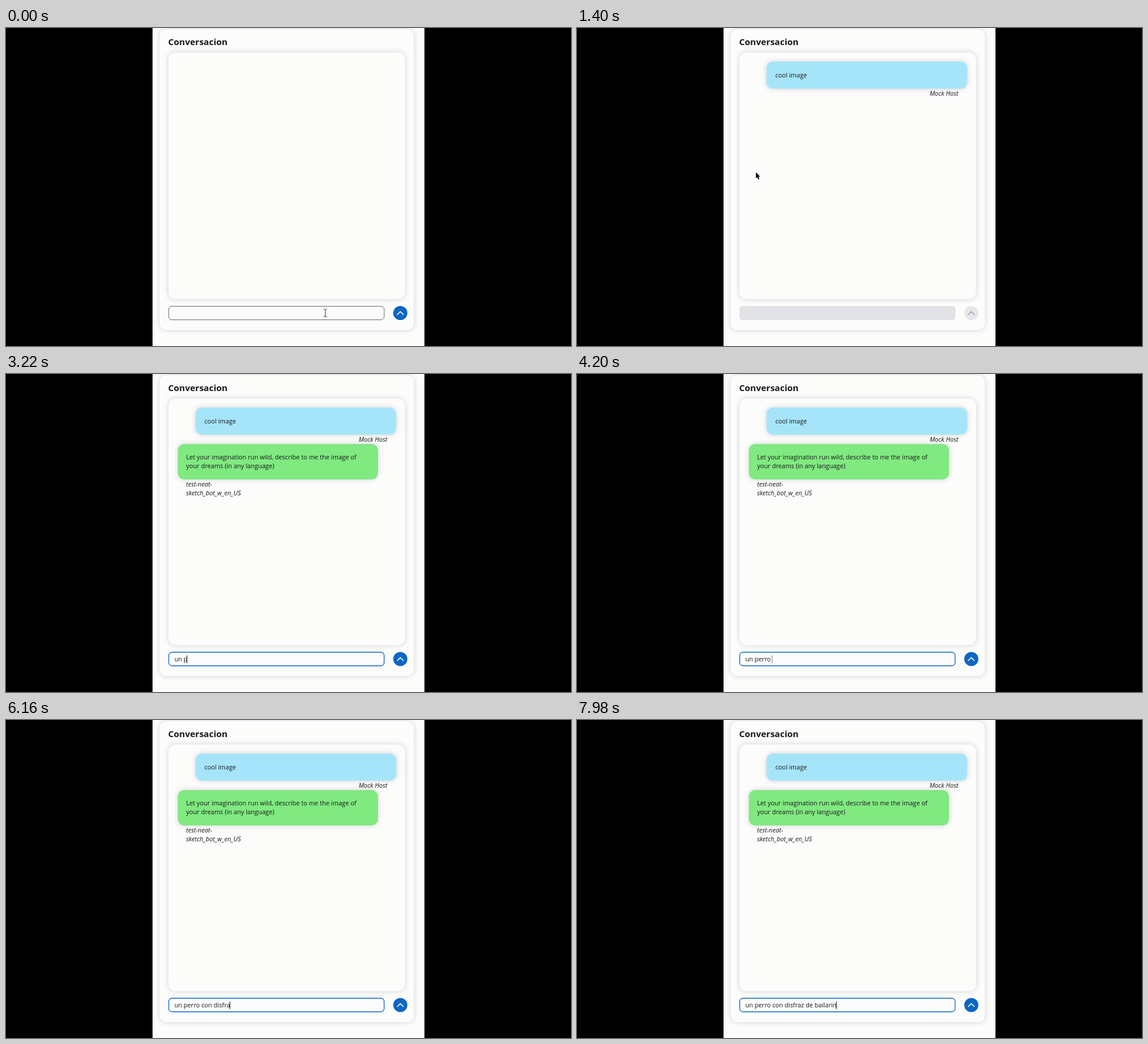
Recreate the animation shown at these times as an HTML page with a canvas. Size 960x540 px, loop 8 s.

```html
<!DOCTYPE html>
<html lang="es">
<head>
<meta charset="utf-8">
<title>Chat</title>
<style>
  html, body { margin: 0; width: 100%; height: 100%; overflow: hidden; background: #000; }
  canvas { display: block; width: 960px; height: 540px; }
</style>
</head>
<body>
<canvas id="stage" width="960" height="540"></canvas>
<script>
const ctx = document.getElementById('stage').getContext('2d');
const LOOP = 8000;
const SANS = '"Open Sans", "Noto Sans", sans-serif';
const BODY = `10.65px ${SANS}`;
const NAME = `italic ${BODY}`;
const PAPER = '#fcfcfb', INK = '#18181a', BLUE = '#0c66c4';

const SENT = 1000, REPLY = 1660, FOCUS = 2200, ERASE = 5340;

// Typing bursts: start, ms per key, keys
const FIRST = [[240, 70, 'cool image']];
const SECOND = [
  [2680, 130, 'un '], [3100, 135, 'perro '], [4620, 85, 'con '],
  [4980, 80, 'de'], [5600, 105, 'disfraz '], [6440, 100, 'de bai'],
  [7280, 35, 'larin']
];

// Mouse waypoints: time, x, y
const PATH = [[1000, 420, 484], [1380, 304, 245], [1700, 304, 245], [2160, 389, 484]];

function typed(bursts, t) {
  let text = '', last = -Infinity;
  for (const [start, step, keys] of bursts) {
    if (t < start) break;
    if (keys === 'de' && t >= ERASE) continue;
    const n = Math.min(keys.length, Math.floor((t - start) / step) + 1);
    text += keys.slice(0, n);
    last = start + (n - 1) * step;
  }
  return { text, last };
}

function along(path, t) {
  let i = 0;
  while (i < path.length - 2 && t >= path[i + 1][0]) i++;
  const [t0, x0, y0] = path[i], [t1, x1, y1] = path[i + 1];
  const p = Math.max(0, Math.min(1, (t - t0) / (t1 - t0)));
  const e = p * p * (3 - 2 * p);
  return [x0 + (x1 - x0) * e, y0 + (y1 - y0) * e];
}

function box(x, y, w, h, r) {
  ctx.beginPath();
  ctx.roundRect(x, y, w, h, r);
}

function glowBox(x, y, w, h, r, fill) {
  ctx.save();
  ctx.shadowColor = 'rgba(70, 70, 95, 0.24)';
  ctx.shadowBlur = 8;
  ctx.fillStyle = fill;
  box(x, y, w, h, r);
  ctx.fill();
  ctx.restore();
}

function label(text, x, y, font = BODY, align = 'left') {
  ctx.font = font;
  ctx.textAlign = align;
  ctx.fillStyle = INK;
  ctx.fillText(text, x, y);
}

function line(points, color, width) {
  ctx.strokeStyle = color;
  ctx.lineWidth = width;
  ctx.beginPath();
  points.forEach(([x, y]) => ctx.lineTo(x, y));
  ctx.stroke();
}

function drawPage() {
  ctx.fillStyle = '#000';
  ctx.fillRect(0, 0, 960, 540);
  ctx.fillStyle = PAPER;
  ctx.fillRect(249, 0, 462, 540);
  glowBox(261, 2, 432, 511, 12, PAPER);
  glowBox(276, 41.5, 402, 419, 12, PAPER);
  label('Conversacion', 275.5, 29, `bold 15px ${SANS}`);
}

function drawMessages(t) {
  if (t >= SENT) {
    glowBox(322, 57, 341, 46, 11, '#a6e5f9');
    label('cool image', 337, 84);
    label('Mock Host', 648, 115, NAME, 'right');
  }
  if (t >= REPLY) {
    glowBox(292, 119, 340, 60, 11, '#80e980');
    label('Let your imagination run wild, describe to me the image of', 306, 145);
    label('your dreams (in any language)', 306, 160);
    label('test-neat-', 306, 191, NAME);
    label('sketch_bot_w_en_US', 306, 206, NAME);
  }
}

function caretAlpha(t, last) {
  if (t < FOCUS) return t > 140 && t < SENT ? 1 : 0;
  if (last < 0) return t >= 2500 ? 1 : 0;
  if (t >= ERASE && t < 5600) return 0;
  if (t >= 4100 && t < 4360) return Math.max(0, 1 - (t - 4100) / 220);
  return t >= 4360 && t < 4620 ? 0 : 1;
}

function drawField(t) {
  const off = t >= SENT && t < REPLY;
  const focused = (t > 140 && t < SENT) || t >= FOCUS;
  if (off) {
    ctx.fillStyle = '#e2e3e6';
    box(276, 472, 367, 24, 5);
    ctx.fill();
  } else {
    ctx.strokeStyle = focused ? BLUE : '#6b6b70';
    ctx.lineWidth = focused ? 1.3 : 1;
    box(276.5, 472.5, 366, 23, 5.5);
    ctx.stroke();
    const { text, last } = typed(t < SENT ? FIRST : SECOND, t);
    label(text, 286, 488);
    const alpha = caretAlpha(t, last);
    if (alpha > 0) {
      const x = Math.round(286 + ctx.measureText(text).width) - 0.5;
      ctx.globalAlpha = alpha;
      line([[x, 478], [x, 491]], INK, 1);
      ctx.globalAlpha = 1;
    }
  }
  ctx.fillStyle = off ? '#e6e7ea' : BLUE;
  ctx.beginPath();
  ctx.arc(670, 484, 12, 0, Math.PI * 2);
  ctx.fill();
  line([[664.5, 487], [670, 481.7], [675.5, 487]], off ? '#a2a2a8' : '#fff', 1.6);
}

function drawBeam(x, y) {
  const color = '#3c3c40';
  line([[x, y - 6], [x, y + 6]], color, 1);
  for (const s of [-1, 1]) {
    line([[x - 3, y + 6.5 * s], [x, y + 5.5 * s], [x + 3, y + 6.5 * s]], color, 1);
  }
}

function drawArrow(x, y) {
  const shape = [[0, 0], [0, 10.5], [2.3, 8.3], [4, 12.2], [5.8, 11.4], [4.2, 7.6], [7.3, 7.6]];
  ctx.beginPath();
  shape.forEach(([dx, dy]) => ctx.lineTo(x + dx, y + dy));
  ctx.closePath();
  ctx.strokeStyle = '#fff';
  ctx.lineWidth = 1.5;
  ctx.stroke();
  ctx.fillStyle = '#000';
  ctx.fill();
}

function drawMouse(t) {
  if (t < 240) return drawBeam(542.5, 484);
  if (t < SENT || t >= 2680) return;
  const [x, y] = along(PATH, t);
  if (t >= REPLY && y > 472) drawBeam(Math.round(x) + 0.5, y - 1);
  else drawArrow(x, y);
}

let start;
function tick(now) {
  start ??= now;
  const t = (now - start) % LOOP;
  drawPage();
  drawMessages(t);
  drawField(t);
  drawMouse(t);
  requestAnimationFrame(tick);
}
requestAnimationFrame(tick);
</script>
</body>
</html>
```
